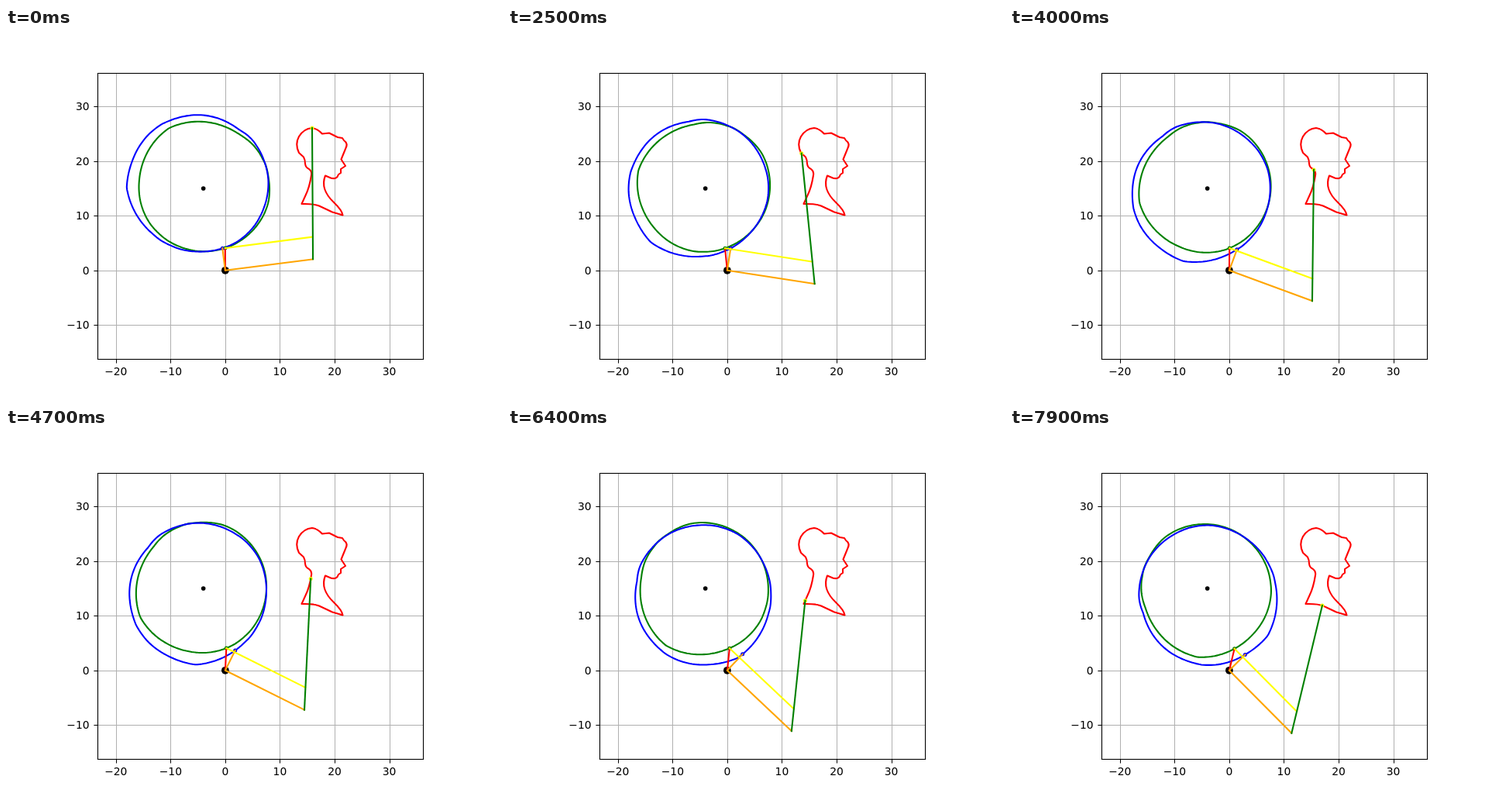
Write an HTML page that moves like this. It is 640 px wide and 480 px high and loops after 8 s.

```html
<!DOCTYPE html>
<html>
<head>
<meta charset="utf-8">
<style>
html, body { margin: 0; width: 100%; height: 100%; overflow: hidden; background: #fff; }
svg { display: block; font: 13.89px "DejaVu Sans", sans-serif; }
path { fill: none; stroke-width: 2.08; stroke-linejoin: round; stroke-linecap: square; }
</style>
</head>
<body>
<svg id="stage" width="640" height="480" viewBox="0 0 640 480"></svg>
<script>
const stage = document.getElementById('stage');
const OX = 282.9, OY = 312.8, SCALE = 7.055;
const ARM = 16.17, ROD = 24, CRANK = 4.08, STEPS = 200, SHOWN = 80;
const HUB = [-4, 15], ORIGIN = [0, 0];

const px = ([x, y]) => [OX + x * SCALE, OY - y * SCALE];
const polar = (r, a) => [r * Math.cos(a), r * Math.sin(a)];
const add = (p, q) => [p[0] + q[0], p[1] + q[1]];
const sub = (p, q) => [p[0] - q[0], p[1] - q[1]];

function make(tag, attrs, text = '') {
  const el = document.createElementNS('http://www.w3.org/2000/svg', tag);
  for (const k in attrs) el.setAttribute(k, attrs[k]);
  el.textContent = text;
  return stage.appendChild(el);
}
const line = (stroke, d = '') => make('path', { stroke, d });
const dot = (r, fill) => make('circle', { r, fill });
const trace = (el, pts, end = '') =>
  el.setAttribute('d', 'M' + pts.map(p => px(p).map(v => v.toFixed(2))).join('L') + end);
function place(el, p) {
  const [x, y] = px(p);
  el.setAttribute('cx', x);
  el.setAttribute('cy', y);
}

// Axes
const thin = (d, stroke) => make('path', { d, stroke, style: 'stroke-width:1;stroke-linecap:butt' });
const snap = v => Math.round(v) + 0.5;
const label = v => String(v).replace('-', '\u2212');
let ticks = '';
for (let v = -20; v <= 30; v += 10) {
  const [x, y] = px([v, v]);
  thin(`M${snap(x)} 58V427`, '#b0b0b0');
  ticks += `M${snap(x)} 428v4.6`;
  make('text', { x, y: 448, 'text-anchor': 'middle' }, label(v));
  if (v < -10) continue;
  thin(`M118 ${snap(y)}H538`, '#b0b0b0');
  ticks += `M118 ${snap(y)}h-4.6`;
  make('text', { x: 107.6, y: Math.round(y + 5), 'text-anchor': 'end' }, label(v));
}
thin(ticks, '#000');

// Head in profile, counter-clockwise from the crown
const head = line('red', `M395 129Q384 130 378 140Q372.5 150 378 161L384 166.5
  Q386 170 386 175Q386.5 180 391 182Q395 185 394 190Q391.5 206 386.5 216L381.5 227
  Q397 226.5 404 229.5L421 237.5L434.5 241.5Q433.5 235 423 225Q405 208 412 190.5
  L419 193.5Q427 196 429 189L432 187V182L438 178L432.5 169.5L438 156Q442 149 436 145
  L434 142L428 141L417 135.5L408 136.5Q402 130 395 129Z`);

// Two-link arm pose that puts the pen on a point
function solve(pen) {
  const d = Math.hypot(...pen);
  const bend = Math.acos((ARM * ARM + d * d - ROD * ROD) / (2 * ARM * d));
  const a = Math.atan2(pen[1], pen[0]) - bend;
  const elbow = polar(ARM, a);
  const rod = sub(pen, elbow);
  const red = polar(CRANK, Math.atan2(rod[1], rod[0]));
  return { pen, elbow, red, orange: polar(CRANK, a + Math.PI / 2), joint: add(elbow, red) };
}
// The pen follows the outline at constant speed
const poses = Array.from({ length: STEPS }, (_, i) => {
  const { x, y } = head.getPointAtLength(head.getTotalLength() * i / STEPS);
  return solve([(x - OX) / SCALE, (OY - y) / SCALE]);
});

// Cam profile: follower positions seen from the turning wheel
const cam = (key, step) => poses.map((pose, j) => {
  const [x, y] = sub(pose[key], HUB);
  const turn = (step - j) * 2 * Math.PI / STEPS;
  return add(HUB, polar(Math.hypot(x, y), Math.atan2(y, x) + turn));
});

const greenCam = line('green'), blueCam = line('blue');
place(dot(2.8, '#000'), HUB);
place(dot(4.9, '#000'), ORIGIN);
const greenDot = dot(2.5, 'green'), penDot = dot(2.5, 'yellow');
const redArm = line('red'), blueDot = dot(2.5, 'blue');
const lever = line('orange'), link = line('yellow'), rod = line('green');
make('rect', { x: 118.5, y: 58.5, width: 420, height: 369, fill: 'none', stroke: '#000', 'stroke-width': 1.1 });

function draw(step) {
  const { pen, elbow, red, orange, joint } = poses[step];
  trace(greenCam, cam('red', step), 'Z');
  trace(blueCam, cam('orange', step), 'Z');
  place(greenDot, red);
  place(blueDot, orange);
  place(penDot, pen);
  trace(redArm, [ORIGIN, red]);
  trace(lever, [orange, ORIGIN, elbow]);
  trace(link, [red, joint]);
  trace(rod, [elbow, pen]);
}

const begin = performance.now();
function tick() {
  draw(Math.floor((performance.now() - begin) / 100) % SHOWN);
  requestAnimationFrame(tick);
}
tick();
</script>
</body>
</html>
```
